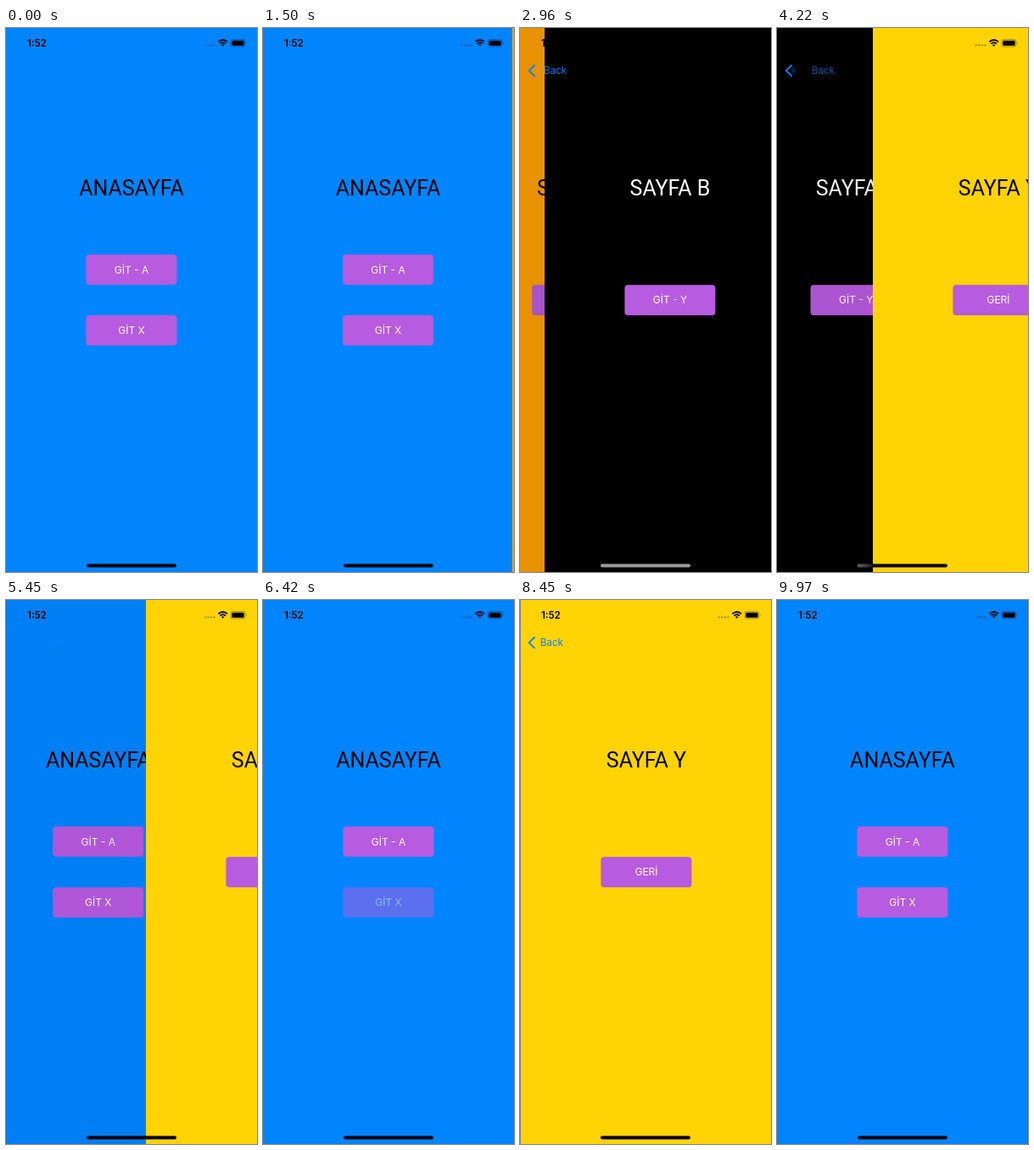
These frames come from a looping animation (296x640 px, 10000 ms). An HTML page:

```html
<!DOCTYPE html>
<html lang="tr">
<head>
<meta charset="utf-8">
<title>Sayfalar</title>
<style>
  html, body { margin: 0; width: 100%; height: 100%; overflow: hidden; background: #000; }
  svg { display: block; width: 100%; height: 100%; }
  text { font-family: Inter, "Noto Sans", sans-serif; }
  .title { font: 25px Roboto, Arial, sans-serif; text-anchor: middle; }
  .label { font-size: 12px; fill: #fff; text-anchor: middle; }
  .back { font-size: 11.7px; fill: #0084ff; }
  .clock { font-size: 11.5px; font-weight: 600; }
</style>
</head>
<body>
<svg id="stage" viewBox="0 0 296 640">
  <defs>
    <linearGradient id="fade">
      <stop offset="0" stop-color="#999"/>
      <stop offset="1" stop-color="#999" stop-opacity=".2"/>
    </linearGradient>
    <clipPath id="afterChevron"><rect x="14" y="38" width="282" height="26"/></clipPath>
  </defs>
  <g id="pages"></g>
  <rect id="dim" width="296" height="640"/>
  <g id="nav">
    <path id="chevron" d="M17 44 L10.6 50.2 L17 56.4" fill="none" stroke="#0084ff"
      stroke-width="1.8" stroke-linecap="round" stroke-linejoin="round"/>
    <g clip-path="url(#afterChevron)">
      <text id="oldBack" class="back" y="54.3">Back</text>
      <text id="newBack" class="back" y="54.3">Back</text>
    </g>
  </g>
  <g id="status">
    <text class="clock" x="25" y="22">1:52</text>
    <g opacity=".28">
      <circle cx="234.6" cy="20.3" r="1.2"/><circle cx="238.2" cy="20.3" r="1.2"/>
      <circle cx="241.8" cy="20.3" r="1.2"/><circle cx="245.4" cy="20.3" r="1.2"/>
    </g>
    <g fill="none" stroke="#000" stroke-width="1.8">
      <path d="M250.4 16.3 Q255.7 11.7 261 16.3"/>
      <path d="M252.3 18.6 Q255.7 15.6 259.1 18.6"/>
    </g>
    <path d="M253.9 19.9 Q255.7 18.5 257.5 19.9 L255.7 21.8 Z"/>
    <rect x="265" y="13.4" width="17" height="8.6" rx="2.4" fill="none" stroke="#000" stroke-opacity=".4" stroke-width=".8"/>
    <rect x="266.3" y="14.7" width="14.4" height="6" rx="1.3"/>
    <path d="M283 16.2 q1.3 1.5 0 3 z" opacity=".45"/>
  </g>
  <rect x="95" y="630.6" width="106" height="3.8" rx="1.9"/>
  <rect id="lit" y="630.6" height="3.8" rx="1.9"/>
</svg>
<script>
const W = 296, LOOP = 10000;
const $ = id => document.getElementById(id);

// Each button: [top edge, text]
const pages = {
  home: { bg: '#0085ff', ink: '#000', title: 'ANASAYFA', buttons: [[266.4, 'GİT - A'], [338, 'GİT X']] },
  a: { bg: '#ff9f02', ink: '#000', title: 'SAYFA A', buttons: [[302.3, 'GİT - B']] },
  b: { bg: '#000', ink: '#fff', title: 'SAYFA B', buttons: [[302.3, 'GİT - Y']] },
  x: { bg: '#98989c', ink: '#000', title: 'SAYFA X', buttons: [[302.3, 'GİT - Y']] },
  y: { bg: '#ffd304', ink: '#000', title: 'SAYFA Y', buttons: [[302.3, 'GERİ']] }
};

// ticks: moments at which the screen refreshes, beginning with the tap
const moves = [
  { from: 'home', to: 'a', start: 1494, ticks: [1330, 1500, 1610, 1720, 1830, 1940, 2050] },
  { from: 'a', to: 'b', start: 2745, ticks: [2610, 2730, 2840, 2960, 3080, 3200] },
  { from: 'b', to: 'y', start: 4105.5, ticks: [3970, 4110, 4220, 4330, 4450, 4560] },
  { from: 'y', to: 'home', pop: true, start: 5347.5, ticks: [5210, 5330, 5450, 5560, 5670, 5790] },
  { from: 'home', to: 'x', button: 1, start: 6595, ticks: [6420, 6600, 6710, 6820, 6930, 7050] },
  { from: 'x', to: 'y', start: 7995, ticks: [7890, 8000, 8110, 8220, 8330, 8450] },
  { from: 'y', to: 'home', pop: true, start: 9430, ticks: [9300, 9410, 9520, 9640, 9750, 9860, 9970] }
];
const idle = { from: 'y', to: 'home', pop: true, start: -9999, ticks: [0] };

function make(tag, attrs, parent, text) {
  const el = document.createElementNS('http://www.w3.org/2000/svg', tag);
  set(el, attrs);
  if (text) el.textContent = text;
  return parent.appendChild(el);
}

function set(el, attrs) {
  for (const k in attrs) el.setAttribute(k, attrs[k]);
}

for (const page of Object.values(pages)) {
  page.el = make('g', {}, $('pages'));
  make('rect', { width: W, height: 640, fill: page.bg }, page.el);
  make('text', { class: 'title', x: 148, y: 197, fill: page.ink }, page.el, page.title);
  page.keys = page.buttons.map(([y, text]) => {
    const key = make('g', {}, page.el);
    make('rect', { x: 94.4, y, width: 107, height: 35.6, rx: 4, fill: '#b75be0' }, key);
    make('text', { class: 'label', x: 148, y: y + 22.1 }, key, text);
    return key;
  });
}

// Critically damped spring from 0 to 1
function spring(ms) {
  const z = Math.max(0, ms) * 0.01826;
  return 1 - (1 + z) * Math.exp(-z);
}

function place(page, x) {
  set(page.el, { transform: `translate(${x} 0)`, display: 'inline' });
}

function drawNav(m, p) {
  const hadBack = m.from !== 'home', hasBack = m.to !== 'home';
  set($('chevron'), { opacity: hadBack && hasBack ? 1 : hasBack ? p : 1 - p });
  set($('oldBack'), { x: 23.6 + (m.pop ? 45 : -45) * p, opacity: hadBack ? 1 - p : 0 });
  set($('newBack'), { x: 23.6 + 45 * (1 - p), opacity: hasBack ? p : 0 });
}

// The home bar turns light where it lies on the black page
function drawBar(m, p, edge) {
  const entering = m.to === 'b', leaving = m.from === 'b';
  const left = entering ? Math.max(95, edge) : 95;
  const right = leaving ? Math.min(201, edge) : 201;
  set($('lit'), {
    x: left,
    width: entering || leaving ? Math.max(0, right - left) : 0,
    fill: leaving && p > 0 ? 'url(#fade)' : '#999',
    opacity: leaving ? 1 - p * 0.5 : 1
  });
}

function render(t) {
  const m = moves.findLast(v => v.ticks[0] <= t) || idle;
  const now = m.ticks.findLast(v => v <= t);
  const p = spring(now - m.start);
  const cover = m.pop ? p : 1 - p;
  const edge = Math.round(W * cover);
  const top = pages[m.pop ? m.from : m.to];
  const under = pages[m.pop ? m.to : m.from];

  for (const page of Object.values(pages)) {
    set(page.el, { display: 'none' });
    page.keys.forEach(key => set(key, { opacity: 1 }));
  }
  place(under, -0.3 * W * (1 - cover));
  place(top, edge);
  $('pages').append(under.el, $('dim'), top.el);
  set($('dim'), { opacity: 0.1 * (1 - cover) });
  if (now < m.start) set(pages[m.from].keys[m.button || 0], { opacity: 0.5 });

  drawNav(m, p);
  drawBar(m, p, edge);
}

const born = performance.now();
function frame() {
  render((performance.now() - born) % LOOP);
  requestAnimationFrame(frame);
}
frame();
</script>
</body>
</html>
```
